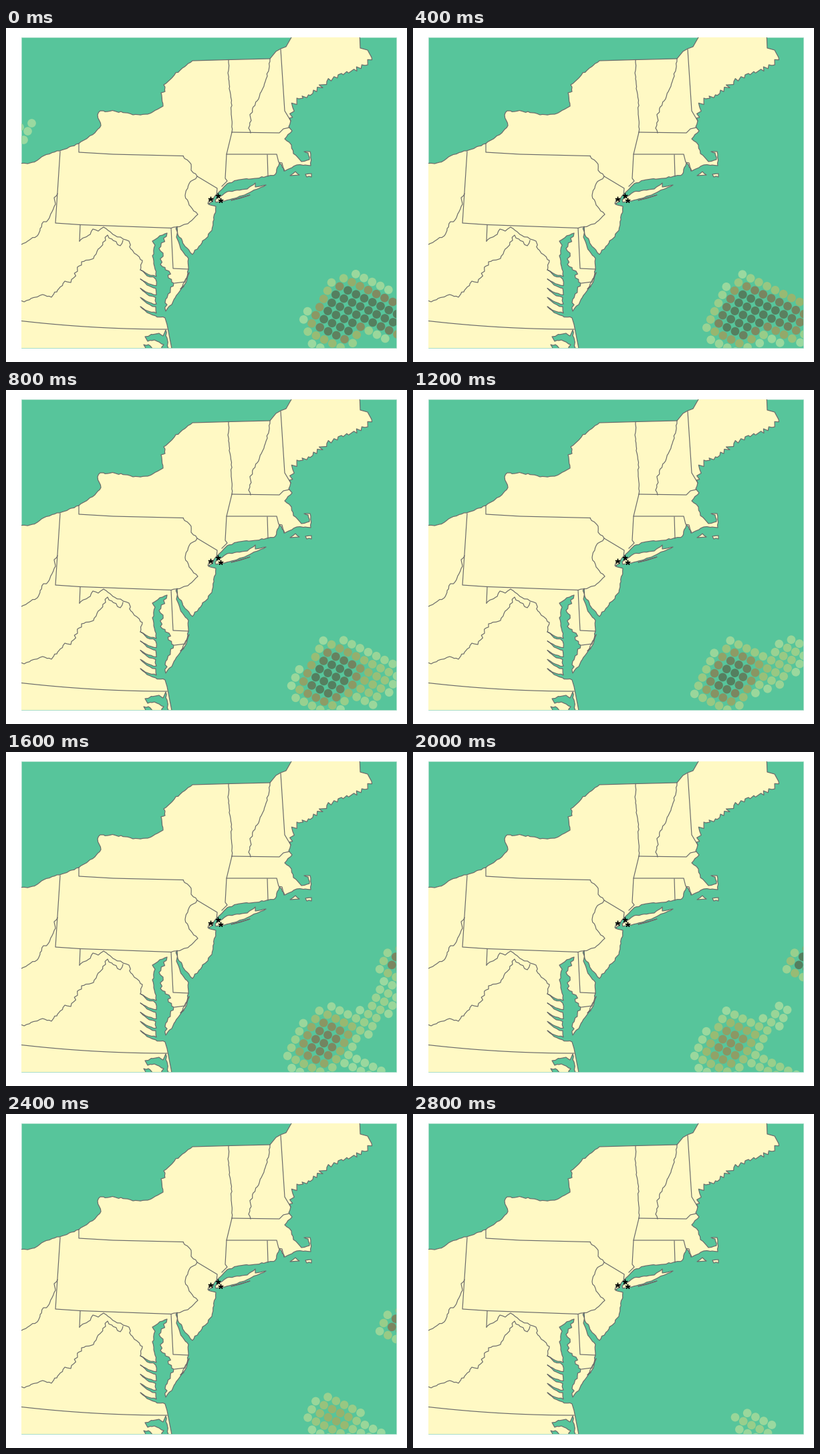
A matplotlib script that plays this animation: 600 px wide and 500 px high, repeating every 3200 ms.

```python
import numpy as np
import matplotlib.pyplot as plt
from matplotlib.animation import FuncAnimation
from matplotlib.colors import LinearSegmentedColormap
from matplotlib.patches import Polygon, Rectangle

WATER, LAND, LINE = "#57c59b", "#fff9c4", "#6a6a6a"
LEFT, RIGHT, TOP, BOTTOM = 23, 584, 14, 479
STEPS = 8

fig = plt.figure(figsize=(6, 5), dpi=100, facecolor="white")
ax = fig.add_axes([0, 0, 1, 1])
ax.set_xlim(0, 600)
ax.set_ylim(500, 0)
ax.axis("off")
sea = Rectangle((LEFT, TOP), RIGHT - LEFT, BOTTOM - TOP, fc=WATER, ec="#a8dcc8", lw=0.5)
ax.add_patch(sea)
rng = np.random.default_rng(4)


def rough(pts, amp=0.6, teeth=0.0, step=4):
    """Subdivide a polyline, add noise and optional zigzag inlets."""
    out, side = [pts[0]], 1
    for p, q in zip(pts, pts[1:]):
        p, q = np.array(p, float), np.array(q, float)
        run = q - p
        size = np.hypot(*run)
        normal = np.array([-run[1], run[0]]) / size
        n = max(1, round(size / step))
        for k in range(1, n):
            side = -side
            out.append(tuple(p + run * k / n + normal * side * teeth + rng.normal(0, amp, 2)))
        out.append(tuple(q))
    return out


def area(pts, color=LAND):
    patch = Polygon(pts, closed=True, fc=color, ec=LINE, lw=0.85, joinstyle="round")
    ax.add_patch(patch)
    patch.set_clip_path(sea)


def border(pts, amp=0.0):
    pts = rough(pts, amp) if amp else pts
    line, = ax.plot(*zip(*pts), color=LINE, lw=0.85, solid_joinstyle="round")
    line.set_clip_path(sea)


def river(x, y):
    """Narrow inlet with its tip at (x, y), opening to the bay on the right."""
    return [(x + 24, y + 10), (x + 12, y + 7), (x, y), (x + 10, y + 9), (x + 23, y + 14)]


# mainland outline, clockwise from the west
lakes = [(10, 203), (36, 202), (47, 198), (57, 191), (80, 184), (109, 173), (133, 157),
         (142, 146), (137, 130), (141, 124), (172, 125), (190, 130), (212, 129),
         (235, 117), (232, 97), (238, 95), (236, 85), (264, 60), (279, 49)]
north = [(279, 49), (333, 47.5), (395, 46), (404, 35), (411, 31), (419, 28), (427, 14),
         (430, 5), (529, 5), (530, 30), (541, 33), (547, 44)]
maine = [(547, 44), (537, 56), (512, 67), (497, 70), (480, 80), (459, 98), (438, 106),
         (429, 119), (426, 139)]
cape = [(426, 139), (423, 148), (428, 154), (417, 166), (427, 175), (430, 188),
        (442, 200), (454, 197), (452, 187), (446, 185), (455, 185), (456, 206),
        (435, 205), (417, 214), (409, 202), (403, 219)]
sound = [(403, 219), (375, 225), (345, 228), (331, 233), (318, 246), (303, 264), (314, 267)]
jersey = [(314, 267), (308, 303), (291, 325), (279, 339), (268, 327), (257, 309), (256, 297)]
delaware = [(256, 297), (255, 313), (264, 334), (273, 345), (273, 361), (266, 387),
            (253, 404), (248, 414), (239, 424)]
bay_east = [(239, 424), (239, 406), (246, 392), (251, 382), (243, 374), (244, 364),
            (231, 354), (235, 337), (229, 330), (240, 312), (241, 307)]
bay_west = [(241, 307), (230, 311), (219, 319), (223, 325), (219, 341), (223, 361)]
for tip in np.linspace(362, 417, 5):
    bay_west += river(201, tip)
bay_west.append((238, 434))

coast = rough(lakes) + north[1:]
for pts, amp, teeth in ((maine, 1.3, 2.6), (cape, 0.6, 0), (sound, 0.6, 0),
                        (jersey, 0.6, 0), (delaware, 0.6, 0), (bay_east, 0.7, 1.4),
                        (bay_west, 0.6, 0)):
    coast += rough(pts, amp, teeth)[1:]
area(coast + [(241, 444), (249, 485), (10, 485)])

# islands
area(rough([(313, 257), (331, 245), (361, 241), (373, 232), (373, 238), (389, 235),
            (357, 250), (327, 259), (314, 261)], 0.4))
area([(302, 263), (304, 257), (310, 256), (309, 260)])
area([(337, 258), (365, 250), (350, 255)])
area(rough([(425, 221), (433, 215), (439, 220)], 0.4))
area(rough([(448, 219), (457, 218), (457, 223), (450, 223)], 0.4))
area(rough([(274, 366), (268, 383), (261, 391), (268, 379)], 0.4))

# southern inlets
area(rough([(208, 462), (229, 457), (235, 461), (239, 452), (244, 486), (234, 486),
            (236, 474), (222, 467), (212, 469)], 0.8), WATER)
area(rough([(206, 474), (216, 476), (222, 484), (212, 484)], 0.5), WATER)

# straight borders
border([(109, 173), (109, 186), (160, 189), (265, 191.5)])
border([(81, 185), (74, 292), (111, 294.5), (247, 299.5), (250, 360), (273, 361)])
border([(111, 294.5), (110, 319)])
border([(286, 222), (316, 240), (315, 250)])
border([(252, 382), (268, 380)])
border([(338, 156), (409, 157), (415, 151), (424, 149)])
border([(338, 156), (330, 189), (328, 225), (331, 229), (323, 237)])
border([(330, 189), (405, 189), (408, 201), (413, 202), (416, 214)])
border([(391, 190), (392, 222)])
border([(411, 32), (417, 124), (426, 139)])
s = np.linspace(0, 1, 20)
border(list(zip(23 + 218 * s, 438.5 + 12.5 * s * (2 - s))))

# rivers and ridges
border([(265, 191.5), (277, 204), (277, 213), (286, 222), (274, 233), (268, 251),
        (274, 265), (287, 279), (272, 293), (247, 299.5)], 0.6)
border([(77, 248), (72, 254), (74, 264), (65, 284), (56, 290), (47, 311), (15, 329)], 0.8)
border([(110, 319), (126, 309), (130, 301), (138, 304), (146, 298), (160, 309),
        (184, 319), (187, 331), (204, 348), (201, 362)], 0.8)
border([(175, 318), (171, 326), (152, 310), (131, 345), (113, 350), (97, 381),
        (88, 379), (68, 403), (58, 400), (15, 411)], 0.9)
border([(333, 47.5), (334, 84), (337, 112), (338, 156)], 0.6)
border([(395, 46), (391, 72), (378, 106), (370, 118), (363, 150), (366, 157)], 0.6)

ax.plot([306, 317, 320.5], [255.5, 251.3, 257.8], ls="none", marker=(5, 2, 0),
        ms=5.4, mew=1, color="black", zorder=6)

ramp = LinearSegmentedColormap.from_list("rain", [
    (0, "#9ad9a0"), (0.18, "#98ce8a"), (0.35, "#98b870"), (0.55, "#8d9964"),
    (0.75, "#7a8560"), (1, "#547f5f")])
col, row = (g.ravel() for g in np.meshgrid(np.arange(-4, 11), np.arange(-10, 10)))


def spots(i, j, x0=487, y0=381):
    """Pixel places of cells on the tilted square grid."""
    return np.column_stack((x0 + 12.25 * i - 5.9 * j, y0 + 5.9 * i + 12.25 * j))


def cell_cloud(ci, cj, strength, w, h):
    u = np.abs(col - ci + 0.15 * (row - cj)) / w
    return strength * np.exp(-u ** 3 - (np.abs(row - cj) / h) ** 3)


def pulse(n, peak, width):
    return max(0, 1 - ((n - peak) / width) ** 2)


def rainfall(n):
    main = cell_cloud(np.interp(n, [0, 3, 5, 7], [2.6, 0.8, 0.9, 4]), 2.4 + 0.37 * n,
                      1.6 - 0.19 * n, 2.5, np.interp(n, [5, 7], [3.3, 1.2]))
    tail = cell_cloud(7.1 - 0.6 * n, np.interp(n, [0, 2, 4, 5], [0.6, 1.6, -2, 0]),
                      np.interp(n, [0, 2, 5, 6], [1.5, 0.38, 0.18, 0]),
                      max(2.7 - 0.3 * n, 1), np.interp(n, [0, 4, 5], [1.8, 3.8, 2.7]))
    east = cell_cloud(4.3, -7.6, 1.1 * pulse(n, 5, 2), 1.2, 1.6)
    low = cell_cloud(6.5, 4.5, 0.28 * pulse(n, 5, 1.4), 2.8, 1.3)
    return main + tail + east + low


dots = ax.scatter([], [], s=(12.7 * 0.72) ** 2, linewidths=0, zorder=5)
lake = spots(np.array([0, 0, 0, -1]), np.array([0, 1, 2, 1]), 38, 142)
lake_dots = ax.scatter(*lake.T, s=(12.7 * 0.72) ** 2, color=ramp(0.0), linewidths=0, zorder=5)
for group in (dots, lake_dots):
    group.set_clip_path(sea)


def draw(n):
    rain = rainfall(n)
    wet = rain > 0.1
    dots.set_offsets(spots(col[wet], row[wet]))
    dots.set_facecolors(ramp(np.clip(rain[wet] * 1.1 - 0.12, 0, 1)))
    lake_dots.set_visible(n == 0)
    return dots, lake_dots


anim = FuncAnimation(fig, draw, frames=STEPS, interval=400, repeat=True,
                     repeat_delay=0, init_func=lambda: draw(0), blit=False)
plt.show()
```
